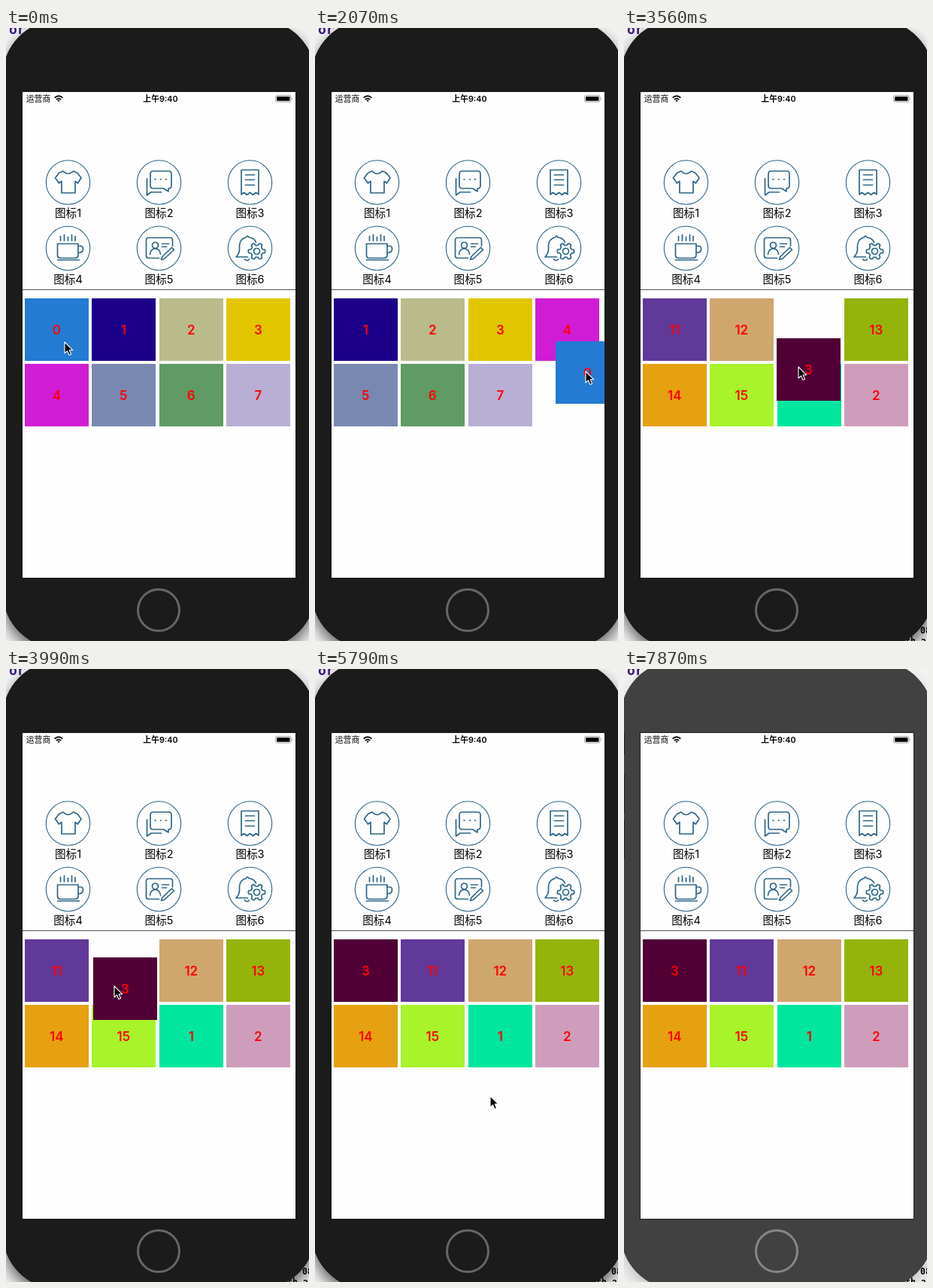
Write an HTML page that moves like this. It is 403 px wide and 814 px high and loops after 7970 ms.

```html
<!DOCTYPE html>
<html lang="zh">
<head>
<meta charset="utf-8">
<title>Drag to reorder</title>
<style>
html, body { margin: 0; width: 100%; height: 100%; overflow: hidden; background: #f3f3f4; }
svg { display: block; width: 403px; height: 814px; --body: #1b1b1b; --ring: #666; --edge: #1b1b1b; --shade: #0009; }
svg.dim { --body: #414141; --ring: #868686; --edge: #222; --shade: #0003; }
text { font-family: Inter, "Noto Sans CJK SC", "Noto Sans CJK", sans-serif; text-anchor: middle; }
.mono { font-family: "DejaVu Sans Mono", monospace; font-weight: bold; text-anchor: start; }
.body { fill: var(--body); filter: drop-shadow(0 10px 10px var(--shade)); }
.icon { fill: none; stroke: #2e6587; stroke-width: 1.7; stroke-linejoin: round; stroke-linecap: round; }
.icon .rim { stroke-width: 1.1; }
.tile text { font-size: 17px; font-weight: 600; fill: #f00; }
</style>
</head>
<body>
<svg id="stage" viewBox="0 0 403 814">
  <defs>
    <clipPath id="screen"><rect x="22" y="85" width="363" height="645"/></clipPath>
  </defs>
  <rect width="403" height="814" fill="#f3f3f4"/>
  <rect class="body" x="-4" y="-10" width="415" height="833" rx="73"/>
  <text class="mono" x="4" y="8" font-size="18" fill="#3c1a78">or</text>
  <g id="log">
    <text class="mono" x="394" y="804" font-size="11.5">08</text>
    <text class="mono" x="374" y="818" font-size="11.5">th a</text>
  </g>
  <rect x="-4" y="-10" width="415" height="833" rx="73" style="fill:var(--body)"/>
  <path d="M0 85V113M0 140V192M0 200V252" style="stroke:var(--edge)" stroke-width="2"/>
  <circle cx="203" cy="773" r="27.5" fill="none" style="stroke:var(--ring)" stroke-width="3"/>
  <rect x="21.5" y="84.5" width="364" height="646" fill="#fefefe" style="stroke:var(--edge)"/>
  <text x="43" y="98" font-size="10.8">运营商</text>
  <g fill="none" stroke="#000" stroke-width="1.8">
    <path d="M64.6 92.6Q70 87.8 75.4 92.6M66.8 95Q70 92.2 73.2 95"/>
    <path d="M68.3 96.2Q70 94.8 71.7 96.2L70 98Z" fill="#000" stroke="none"/>
  </g>
  <text x="205.5" y="98" font-size="10.8" font-weight="600">上午9:40</text>
  <rect x="358.5" y="89.5" width="20.5" height="8.6" rx="2" fill="none" stroke="#888" stroke-width=".8"/>
  <rect x="360" y="91" width="17.5" height="5.7" rx="1"/>
  <path d="M380 92.3Q381.6 93.8 380 95.3Z" fill="#777"/>
  <g id="icons"></g>
  <path d="M22 347.5H385" stroke="#555"/>
  <g clip-path="url(#screen)">
    <g id="before"></g>
    <g id="after"></g>
  </g>
  <g id="cursor">
    <path d="M0 0V15L3.5 11.8L6 17.5L8.6 16.3L6.2 10.8H10.8Z" stroke="#fff" stroke-width="1.1" stroke-linejoin="round"/>
  </g>
</svg>
<script>
const LOOP = 7970, DIM = 7870, SWAP = 3555, RELEASE = 5190, SCROLL = 2853, PAGE = 363;
const $ = id => document.getElementById(id);

function add(parent, tag, attrs, text) {
  const el = document.createElementNS("http://www.w3.org/2000/svg", tag);
  for (const k in attrs) el.setAttribute(k, attrs[k]);
  if (text !== undefined) el.textContent = text;
  return parent.appendChild(el);
}

// Icon outlines around the centre of each circle
let gear = "";
for (let i = 0; i <= 64; i++) {
  const a = i / 64 * 2 * Math.PI, r = 9.5 + 1.7 * Math.tanh(3 * Math.cos(6 * a));
  gear += (i ? "L" : "M") + (9 + r * Math.cos(a)).toFixed(1) + " " + (4 + r * Math.sin(a)).toFixed(1);
}
const ICONS = [
  "M-6.5 -15L-12 -12.5L-17 -6L-12 1L-8.5 -1.5V14H9.5V-1.5L13 1L17.5 -6L12.5 -12.5L7 -15Q0 -8 -6.5 -15Z",
  "M-8 -15H13Q16.5 -15 16.5 -11V4Q16.5 8 13 8H12.5V12L6 8H-8Q-11.5 8 -11.5 4V-11Q-11.5 -15 -8 -15ZM-5.5 -4h1M2 -4h1M9 -4h1M-16 -5V17L-10.5 13H3",
  "M-11.5 16V-16.5H11.5V16L8 13.5L4 16.5L0 13.5L-4 16.5L-8 13.5ZM-6 -10H6M-6 -3.5H6M-6 3.5H6",
  "M-14 -6H13.5V9Q13.5 13 9 13H-10Q-14 13 -14 9ZM13.5 -3H17Q20 -3 20 1Q20 6 13.5 6M-14 15.5H15M-10 -16V-10M-5 -18V-10M0 -15V-10M5 -18V-10M9.5 -16V-10",
  "M18 -3V-11Q18 -14 15 -14H-14Q-17 -14 -17 -11V10Q-17 13 -14 13H0M-1 -4A4 4 0 1 1 -9 -4A4 4 0 1 1 -1 -4M-12 8Q-11 .5 -5 .5Q1 .5 2 8M4 -6H13M4 -2H10M17 -1L20 2L7 14L3 15L4.5 11Z",
  "M-3 11.5H-18.5Q-14 7 -14 1V-4Q-13 -13 -5 -14.5Q-4 -18.5 -1.5 -14.5Q6 -13.5 8 -8M-7 14.5Q-4 18 -1 14.5" + gear + "M13 4A4 4 0 1 1 5 4A4 4 0 1 1 13 4"
];
ICONS.forEach((d, i) => {
  const x = 82.5 + 121 * (i % 3), y = i < 3 ? 205 : 292.5;
  const g = add($("icons"), "g", { class: "icon", transform: `translate(${x} ${y})` });
  add(g, "circle", { class: "rim", r: 29.2 });
  add(g, "path", { d });
  add($("icons"), "text", { x, y: y + 46, "font-size": 14.6 }, "图标" + (i + 1));
});

// Easing
const ramp = (t, from, to) => Math.min(1, Math.max(0, (t - from) / (to - from)));
const smooth = u => (1 - Math.cos(Math.PI * u)) / 2;
const out = (u, power) => 1 - (1 - u) ** power;
const mix = (a, b, p) => a + (b - a) * p;
const slide = (t, start) => smooth(ramp(t, start, start + 300));

// Tiles: eight slots per page, pages side by side
const slot = s => [25 + 89.35 * (s % 4) + PAGE * Math.floor(s / 8), 359 + 87 * Math.floor(s % 8 / 4)];

function tile(parent, n, color, from, to = from, start = 0) {
  const el = add(parent, "g", { class: "tile" });
  add(el, "rect", { width: 85, height: 83, fill: color });
  add(el, "text", { x: 42.3, y: 48 }, n);
  return { el, from: slot(from), to: slot(to), start };
}

const COLORS = ["#247bd3", "#1c008a", "#b9bb8a", "#e2c700", "#d11cd5", "#7888b0", "#609a64", "#b9aed4",
  "#0b8cd3", "#52a732", "#6f816a", "#61399a", "#d0a66f", "#94b40c", "#e5a110", "#a8f32a",
  "#00e69d", "#cf9dbc", "#500035"];

// When the dragged tile reaches a slot, all tiles up to it close the gap
const REACHED = [[1, 1209], [5, 1239], [6, 1309], [7, 1540]];
const before = COLORS.slice(1, 16).map((color, i) => {
  const hit = REACHED.find(([s]) => s > i);
  return tile($("before"), i + 1, color, i + 1, hit ? i : i + 1, hit && hit[1]);
});
const blue = tile($("before"), 0, COLORS[0], 0);

const after = COLORS.slice(11, 18).map((color, i) =>
  tile($("after"), i < 5 ? i + 11 : i - 4, color, i < 2 ? i : i + 1, i + 1, 4220 - 540 * i));
const maroon = tile($("after"), 3, COLORS[18], 0);

// Drags and pointer strokes
const bluePos = t => {
  const u = ramp(t, 740, 2070);
  return [mix(25, 320, smooth(u ** 1.31)) + 9 * ramp(t, 2523, 2817), mix(359, 416, out(u, 1.42))];
};
const maroonPos = t => {
  const u = ramp(t, SWAP, 4590);
  return t < RELEASE ? [mix(203, 34, out(u, 1.3)), mix(412, 364, out(u, 1.65))] : slot(0);
};

const STROKES = [
  { from: [78, 417], to: [360, 456], start: 740, end: 2070, power: [1.26, 3.1] },
  { from: [360, 456], to: [368, 457], start: 2523, end: 2817, power: [1, 1] },
  { from: [232, 450], to: [75, 405], start: SWAP, end: 4590, power: [1.47, 1.85] },
  { from: [75, 405], to: [247, 612], start: 5040, end: 6230, power: [2.56, 1.56] },
  { from: [247, 612], to: [338, 815], start: 6230, end: 7270, power: [1.5, 1.5] }
];
function cursorPos(t) {
  const s = STROKES.filter(s => t >= s.start).pop() || STROKES[0];
  const u = ramp(t, s.start, s.end);
  return s.from.map((v, i) => mix(v, s.to[i], out(u, s.power[i])));
}

// The picture advances in even steps inside each span: start, end, steps
const SPANS = [[890, 2070, 8], [2670, 4590, 13], [5190, 7270, 14]];
function stepped(t) {
  let held = 0;
  for (const [a, b, n] of SPANS) {
    if (t < a) break;
    const d = (b - a) / n;
    held = a + d * Math.min(n, Math.floor((t - a + 10) / d));
  }
  return held;
}

const place = (el, [x, y]) => el.setAttribute("transform", `translate(${Math.round(x)} ${Math.round(y)})`);
const show = (el, on) => { el.style.display = on ? "" : "none"; };
const settle = (tiles, t) => tiles.forEach(({ el, from, to, start }) =>
  place(el, from.map((v, i) => mix(v, to[i], slide(t, start)))));

function draw(time) {
  const t = stepped(time), swapped = t >= SWAP;
  $("stage").classList.toggle("dim", time >= DIM);
  show($("before"), !swapped);
  show($("after"), swapped);
  show($("log"), swapped);
  show($("cursor"), time < DIM);
  place($("cursor"), cursorPos(t));
  settle(before, t);
  settle(after, t);
  place(blue.el, bluePos(t));
  place(maroon.el, maroonPos(t));
  place($("before"), [-PAGE * slide(t, SCROLL), 0]);
}

const t0 = performance.now();
function tick() {
  draw((performance.now() - t0) % LOOP);
  requestAnimationFrame(tick);
}
tick();
</script>
</body>
</html>
```
